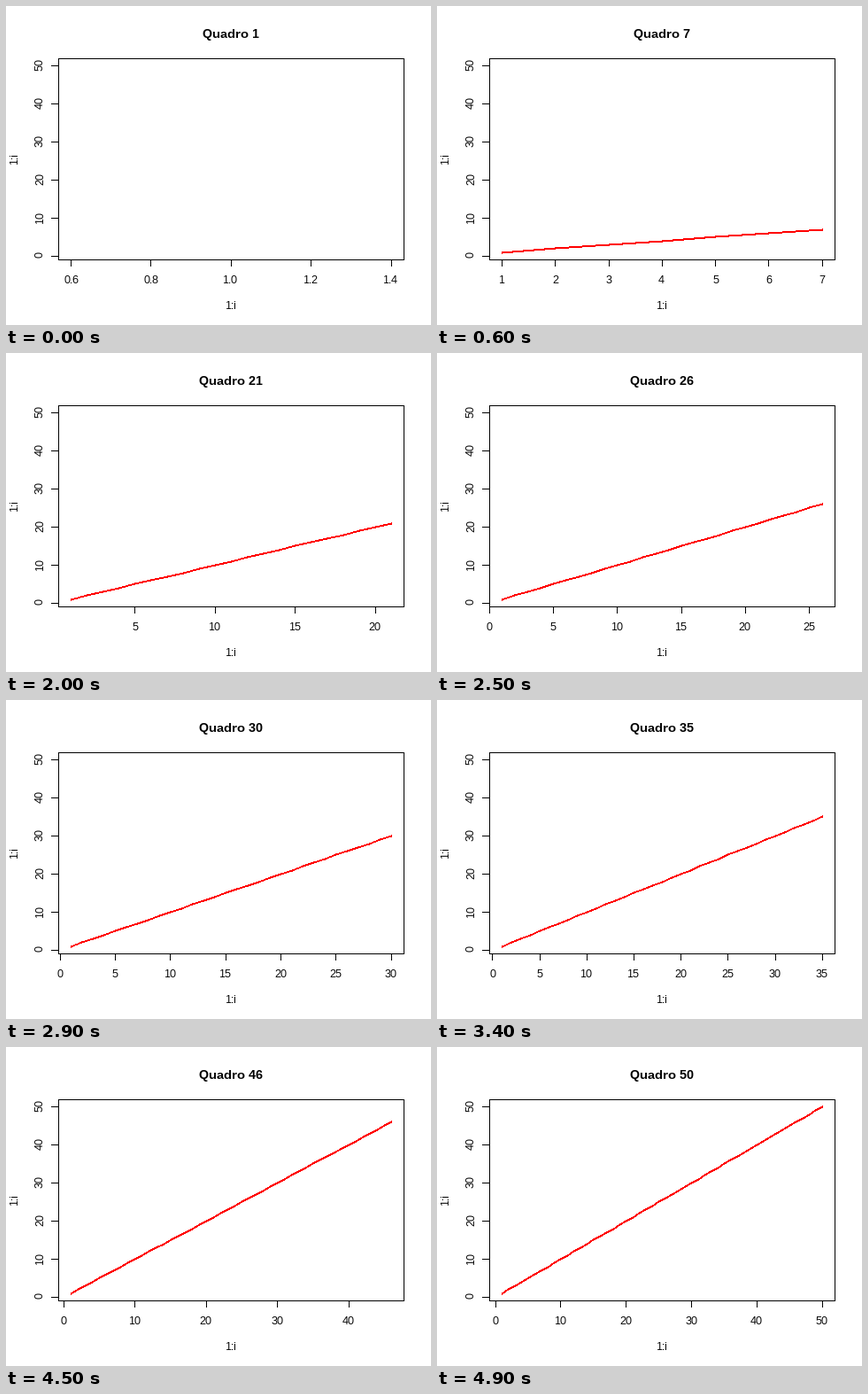
Animation, 480 px wide and 360 px high, one loop 5 s. Source, as a matplotlib script:

```python
import math

import matplotlib.pyplot as plt
import numpy as np
from matplotlib.animation import FuncAnimation
from matplotlib.patches import Rectangle

# Full hinting keeps small text on the pixel grid.
plt.rcParams.update({
    "font.family": "Liberation Sans",
    "text.hinting": "native",
    "text.hinting_factor": 1,
    "toolbar": "None",
})

WIDTH, HEIGHT, DPI = 480, 360, 72
LEFT, RIGHT, TOP, BOTTOM = 59.04, 449.76, 59.04, 286.56
TICK = 8
STEPS = 50
EPS = 1e-10

fig = plt.figure(figsize=(WIDTH / DPI, HEIGHT / DPI), dpi=DPI, facecolor="white")
ax = fig.add_axes([0, 0, 1, 1])


def padded(low, high):
    """Widen a range by 4 % on both sides."""
    if low == high:
        low, high = low * 0.6, high * 1.4
    margin = 0.04 * (high - low)
    return low - margin, high + margin


def pretty_ticks(low, high):
    """Return a round tick step and the tick values inside the range."""
    cell = (high - low) / 5
    base = 10.0 ** math.floor(math.log10(cell))
    unit = base
    for factor, bias in ((2, 0.8), (5, 1.7), (10, 0.8)):
        if factor * base - cell >= bias * (cell - unit):
            break
        unit = factor * base
    first = math.ceil(low / unit - EPS)
    last = math.floor(high / unit + EPS)
    return unit, [k * unit for k in range(first, last + 1)]


def scale(value, limits, start, end):
    low, high = limits
    return start + (value - low) / (high - low) * (end - start)


def pixel(position):
    return math.floor(position + 1e-7)


def bar(x, y, width, height):
    ax.add_patch(Rectangle((x, y), width, height, color="black", lw=0))


def label(x, baseline, text, size=12, weight="normal"):
    ax.text(x - 0.3, baseline, text, size=size, weight=weight,
            ha="center", va="baseline")


def side_label(baseline, y, text):
    ax.text(baseline, y - 1, text, size=12, rotation=90,
            rotation_mode="anchor", ha="center", va="baseline")


def draw_frame_and_axes(x_limits, y_limits):
    left, right, top, bottom = map(pixel, (LEFT, RIGHT, TOP, BOTTOM))
    for y in (top, bottom):
        bar(left, y, right - left + 1, 1)
    for x in (left, right):
        bar(x, top, 1, bottom - top + 1)

    unit, ticks = pretty_ticks(*x_limits)
    digits = 1 if unit < 1 else 0
    for value in ticks:
        x = scale(value, x_limits, LEFT, RIGHT)
        bar(pixel(x), bottom, 1, TICK)
        label(round(x), 313, f"{value:.{digits}f}")

    for value in pretty_ticks(*y_limits)[1]:
        y = pixel(scale(value, y_limits, BOTTOM, TOP))
        bar(left - TICK, y, TICK, 1)
        side_label(42, y, f"{value:.0f}")


def draw_line(count, x_limits, y_limits):
    """Fill a two-pixel line column by column, with hard edges."""
    values = range(1, count + 1)
    xs = [pixel(scale(v, x_limits, LEFT, RIGHT)) for v in values]
    ys = [pixel(scale(v, y_limits, BOTTOM, TOP)) for v in values]
    columns = np.arange(xs[0], xs[-1] + 1)
    center = np.interp(columns, xs, ys)
    half = math.hypot(1, (ys[0] - ys[-1]) / (xs[-1] - xs[0]))
    ax.stairs(np.floor(center + half) + 1, np.append(columns, columns[-1] + 1),
              baseline=np.floor(center - half) + 1, fill=True, color="red")


def draw(index):
    count = index + 1
    ax.clear()
    ax.set(xlim=(0, WIDTH), ylim=(HEIGHT, 0))
    ax.axis("off")

    x_limits, y_limits = padded(1, count), padded(1, STEPS)
    draw_frame_and_axes(x_limits, y_limits)
    label(254, 36, f"Quadro {count}", size=14, weight="bold")
    label(255, 342, "1:i")
    side_label(13, 172, "1:i")
    if count > 1:
        draw_line(count, x_limits, y_limits)
    return []


animation = FuncAnimation(fig, draw, frames=STEPS, interval=100,
                          repeat=True, repeat_delay=0, blit=False)
plt.show()
```
